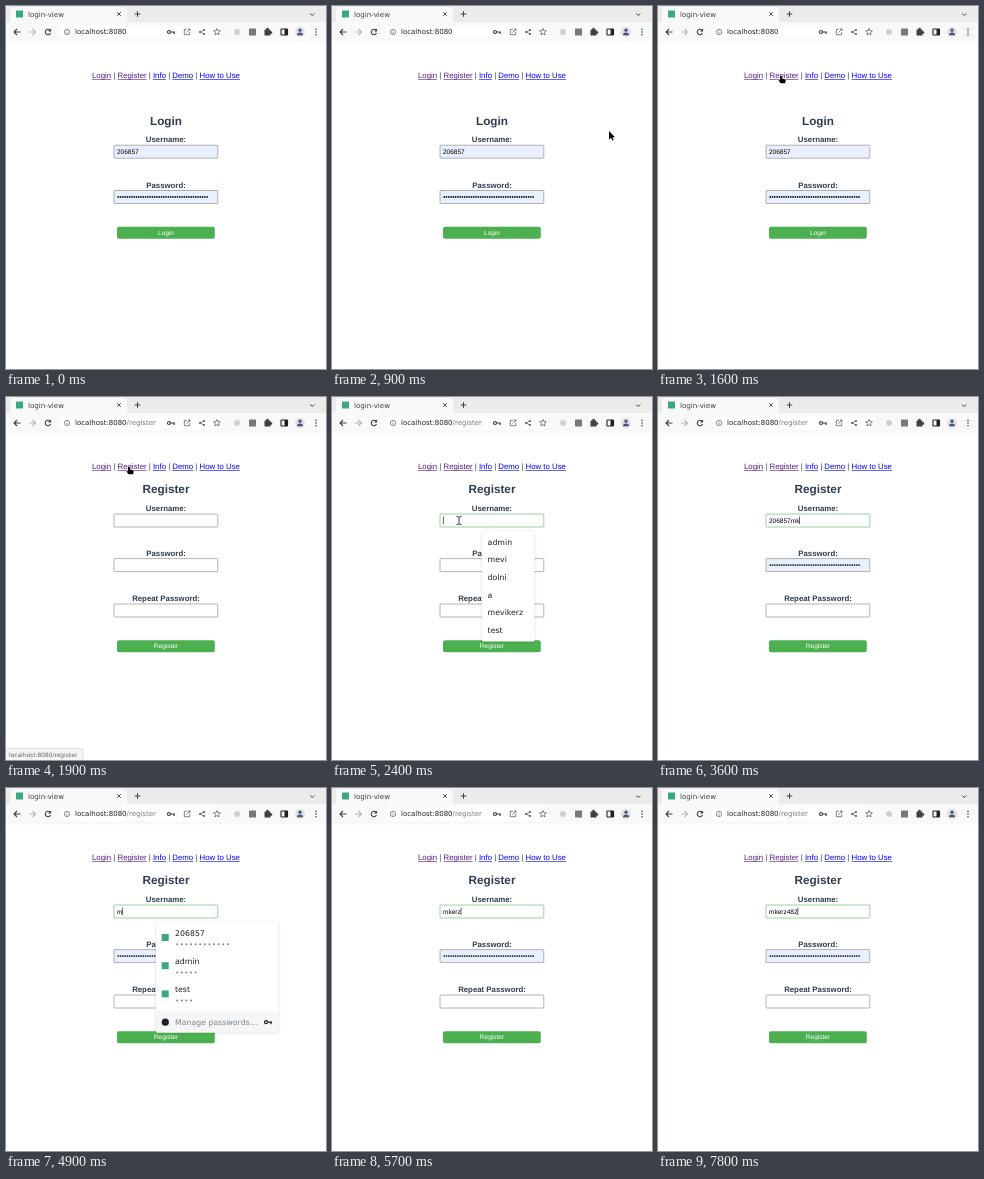
Recreate the animation shown at these times as an HTML page with a canvas. Size 320 px wide and 363 px high, loop 8000 ms.

```html
<!DOCTYPE html>
<html lang="en">
<head>
<meta charset="utf-8">
<title>login-view</title>
<style>
html, body { margin: 0; width: 320px; height: 363px; overflow: hidden; background: #fff; }
canvas { display: block; width: 320px; height: 363px; }
</style>
</head>
<body>
<canvas id="stage"></canvas>
<script>
const W = 320, H = 363, LOOP = 8000;
const ZOOM = 0.4888; // page zoom: 16px text is laid out, then scaled down
const canvas = document.getElementById('stage');
const dpr = window.devicePixelRatio || 1;
canvas.width = W * dpr;
canvas.height = H * dpr;
const c = canvas.getContext('2d');

const UI = '"DejaVu Sans", sans-serif';
const PAGE = '"Liberation Sans", Arial, sans-serif';
const INK = '#2c3e50', DARK = '#202124', GREY = '#5f6368';
const GREEN = '#4caf50', BRAND = '#3aa981', FILLED = '#e8f0fe', EDGE = '#767676';
const USER = '206857';

const typed = [
  [0, ''], [3100, USER], [3200, USER + 'm'], [3600, USER + 'mk'],
  [4200, USER.slice(0, 4)], [4300, ''], [4800, 'm'],
  [5500, 'mk'], [5600, 'mker'], [5700, 'mkerz'],
  [6900, 'mkerz4'], [7000, 'mkerz48'], [7800, 'mkerz482']
];

const path = [
  [100, 164, 145], [300, 164, 145], [600, 185, 174], [900, 277, 125],
  [1200, 170, 46], [1500, 123, 70], [2000, 123, 70], [2300, 127, 123.5],
  [2500, 127, 123.5], [2800, 124, 125], [3100, 124, 125]
];

const within = (t, a, b) => t >= a && t < b;

function text(s, x, y, size, color, family = UI, align = 'left', weight = '') {
  c.save();
  c.translate(x, y);
  c.scale(ZOOM, ZOOM);
  c.font = `${weight} ${size / ZOOM}px ${family}`;
  c.textRendering = 'geometricPrecision';
  c.fillStyle = color;
  c.textAlign = align;
  c.fillText(s, 0, 0);
  const w = c.measureText(s).width * ZOOM;
  c.restore();
  return w;
}

function box(x, y, w, h, color) {
  c.fillStyle = color;
  c.fillRect(x, y, w, h);
}

function rect(x, y, w, h, r, fill, stroke, line = 0.7) {
  c.beginPath();
  c.roundRect(x, y, w, h, r);
  if (fill) { c.fillStyle = fill; c.fill(); }
  if (stroke) { c.strokeStyle = stroke; c.lineWidth = line; c.stroke(); }
}

function disc(x, y, r, color) {
  c.beginPath();
  c.arc(x, y, r, 0, 7);
  c.fillStyle = color;
  c.fill();
}

function ring(x, y, r, color, line = 1, from = 0, to = 7) {
  c.beginPath();
  c.arc(x, y, r, from, to);
  c.strokeStyle = color;
  c.lineWidth = line;
  c.stroke();
}

function stroke(d, x, y, color, line = 1) {
  c.save();
  c.translate(x, y);
  c.strokeStyle = color;
  c.lineWidth = line;
  c.stroke(new Path2D(d));
  c.restore();
}

function shape(d, x, y, fill, edge) {
  c.save();
  c.translate(x, y);
  const p = new Path2D(d);
  if (edge) {
    c.strokeStyle = edge;
    c.lineWidth = 0.8;
    c.lineJoin = 'round';
    c.stroke(p);
  }
  c.fillStyle = fill;
  c.fill(p);
  c.restore();
}

function key(x, y, color) {
  ring(x - 2, y, 1.5, color, 1.2);
  stroke('M-.4 0H4M3 0V2', x, y, color, 1.2);
}

function star(x, y) {
  c.beginPath();
  for (let i = 0; i < 10; i++) {
    const r = i % 2 ? 1.6 : 3.6, a = i * Math.PI / 5;
    c.lineTo(x + r * Math.sin(a), y - r * Math.cos(a));
  }
  c.closePath();
  c.strokeStyle = GREY;
  c.lineWidth = 0.8;
  c.stroke();
}

function browser(registered) {
  box(0, 0, W, 17, '#edebe9');
  rect(4, 1, 117, 20, 4, '#faf9f9');
  box(0, 16, W, 20.5, '#faf9f9');
  rect(10, 4.5, 7, 7, 0, BRAND);
  text('login-view', 22, 10.8, 7.1, '#3c4043');
  stroke('M-1.8 -1.8L1.8 1.8M1.8 -1.8L-1.8 1.8', 113, 8, '#3c4043', 0.9);
  stroke('M-2.8 0H2.8M0 -2.8V2.8', 131.5, 8, '#3c4043');
  stroke('M-2 -1L0 1L2 -1', 306.3, 8.5, '#3c4043');

  stroke('M3.5 0H-3M0 -3L-3 0L0 3', 11, 26, '#3c4043', 1.1);
  stroke('M-3.5 0H3M0 -3L3 0L0 3', 26.5, 26, '#b5b8bc', 1.1);
  ring(42, 26, 2.7, '#3c4043', 1.1, 0.4, 5.5);
  shape('M0 0V-3.2L-3.2 0Z', 45.1, 25.6, '#3c4043');

  rect(53, 19, 164, 14, 7, '#fff');
  ring(61, 26, 2.7, GREY, 0.7);
  stroke('M0 -.3V1.7M0 -1.7V-.9', 61, 26, GREY, 0.7);
  const w = text('localhost:8080', 69, 28.4, 7, DARK);
  if (registered) text('/register', 69 + w, 28.4, 7, '#777a7e');
  key(165, 26, '#3c4043');
  stroke('M0 -2.7H-2.7V2.7H2.7V0M1 -3H3V-1M3 -3L-.5 .5', 181, 26, GREY, 0.8);
  stroke('M2 -2L-2 0L2 2', 196, 26, GREY, 0.8);
  for (const [x, y] of [[2, -2], [-2, 0], [2, 2]]) disc(196 + x, 26 + y, 1.1, GREY);
  star(211, 26);

  disc(231, 26, 3, '#cfd0d2');
  rect(243, 22.5, 7, 7, 0.5, '#77797c');
  rect(258.5, 23.5, 6, 6, 0.5, '#3c4043');
  disc(261.5, 23, 1.3, '#3c4043');
  disc(265, 26.5, 1.3, '#3c4043');
  rect(275, 23, 6.5, 6, 0.5, null, DARK, 1.1);
  box(278.5, 23, 3, 6, DARK);
  disc(294, 26, 5, '#dbe0ea');
  disc(294, 24.2, 1.6, '#46536b');
  shape('M-3 1.2Q-3 -1.6 0 -1.6Q3 -1.6 3 1.2Z', 294, 28, '#46536b');
  for (const dy of [-2.7, 0, 2.7]) disc(310, 26 + dy, 0.8, '#3c4043');
}

function nav() {
  let x = 86;
  const links = ['Login', 'Register', 'Info', 'Demo', 'How to Use'];
  links.forEach((name, i) => {
    const color = i < 2 ? '#551a8b' : '#0000ee';
    const w = text(name, x, 72, 7.82, color, PAGE);
    box(x, 73, w, 0.6, color);
    x += w;
    if (i < links.length - 1) x += text(' | ', x, 72, 7.82, INK, PAGE);
  });
}

function field(label, y, value, fill = '#fff', border = EDGE) {
  text(label, 160, y - 2.6, 7.82, INK, PAGE, 'center', 'bold');
  rect(108, y + 0.2, 103.8, 13, 0.8, fill, border, 0.55);
  return text(value, 111, y + 8.9, 6.52, '#000', PAGE);
}

function secret(y) {
  for (let i = 0; i < 40; i++) disc(112.2 + i * 2.28, y + 6.6, 0.85, '#000');
}

function button(label, y) {
  rect(111, y, 97.8, 12, 2, GREEN);
  text(label, 160, y + 8.2, 6.52, '#fff', PAGE, 'center');
}

function heading(s, y) {
  text(s, 160, y, 11.73, INK, PAGE, 'center', 'bold');
}

function loginPage() {
  heading('Login', 119);
  field('Username:', 139, USER, FILLED);
  field('Password:', 184.3, '', FILLED);
  secret(184.3);
  button('Login', 220.7);
}

function registerPage(t) {
  const focus = t >= 2300, filled = t >= 3100;
  let value = '';
  for (const [at, s] of typed) if (t >= at) value = s;
  heading('Register', 96.3);
  const w = field('Username:', 116.8, value, '#fff', focus ? GREEN : EDGE);
  const blinkOff = within(t, 6300, 6700) || within(t, 7600, 7800);
  if (focus && !blinkOff) box(111 + w, 119.5, 0.6, 7.5, '#000');
  field('Password:', 161.4, '', filled ? FILLED : '#fff');
  if (filled) secret(161.4);
  field('Repeat Password:', 206.8, '');
  button('Register', 243.2);
  if (within(t, 2400, 3100)) historyList();
  if (within(t, 3100, 3200) || within(t, 4400, 5000)) passwordList();
}

function popup(w) {
  c.save();
  c.shadowColor = 'rgba(0,0,0,.16)';
  c.shadowBlur = 3 * dpr;
  c.shadowOffsetY = 0.5 * dpr;
  rect(150, 134.5, w, 110, 1.5, '#fff');
  c.restore();
  shape('M-4.5 0L0 -4L4.5 0Z', 159.5, 135, '#fff');
  stroke('M-4.5 0L0 -4L4.5 0', 159.5, 134.5, '#e6e7e9', 0.5);
}

function historyList() {
  popup(52.5);
  ['admin', 'mevi', 'dolni', 'a', 'mevikerz', 'test'].forEach((s, i) =>
    text(s, 155.6, 147.8 + i * 17.6, 7.82, DARK));
}

function passwordList() {
  popup(122.5);
  [[USER, 12], ['admin', 5], ['test', 4]].forEach(([name, count], i) => {
    const y = i * 28.2;
    rect(155.7, 146 + y, 7, 7, 0, BRAND);
    text(name, 169, 147.6 + y, 7.82, DARK);
    for (let k = 0; k < count; k++) disc(171.2 + k * 4.6, 156.2 + y, 1, '#80868b');
  });
  rect(150, 223, 122.5, 21.5, [0, 0, 1.5, 1.5], '#f5f6f7');
  disc(159.3, 234.2, 3.6, DARK);
  text('Manage passwords…', 169, 237, 7.82, '#80868b');
  key(262, 234.2, DARK);
}

function statusBubble() {
  rect(-2, 351.5, 79, 13, 2, '#f6f5f4', '#d0cecc', 0.6);
  text('localhost:8080/register', 3, 359.6, 5.9, GREY);
}

function pointer(t) {
  if (!within(t, 100, 3100)) return;
  let i = 0;
  while (i < path.length - 2 && t >= path[i + 1][0]) i++;
  const [t0, x0, y0] = path[i], [t1, x1, y1] = path[i + 1];
  const k = (t - t0) / (t1 - t0);
  const x = x0 + (x1 - x0) * k, y = y0 + (y1 - y0) * k;
  const inField = top => x > 108 && x < 212 && y > top && y < top + 13.5;
  const tops = t < 1900 ? [139, 184.3] : [116.8, 161.4, 206.8];
  if (tops.some(inField)) {
    stroke('M-2.5 -4Q0 -4 0 -3Q0 -4 2.5 -4M0 -3V3M-2.5 4Q0 4 0 3Q0 4 2.5 4',
      x, y, '#000', 0.8);
  } else if (x > 111 && x < 141 && y > 65 && y < 76) {
    shape('M-.9 0Q0 -1 .9 0V2.6L4.2 3.4Q5 3.8 4.7 5L4 7.3H-.3L-2.6 4.6Q-2.2 3.6 -.9 4.6Z',
      x, y, '#000', '#fff');
  } else {
    shape('M0 0V8.5L2 6.7L3.4 9.6L4.7 9L3.4 6.2H6Z', x, y, '#000', '#fff');
  }
}

function draw(now) {
  const t = Math.floor(now % LOOP / 100) * 100;
  const registered = t >= 1900;
  c.setTransform(dpr, 0, 0, dpr, 0, 0);
  box(0, 0, W, H, '#fff');
  browser(registered);
  nav();
  if (registered) registerPage(t);
  else loginPage();
  if (within(t, 1700, 2300)) statusBubble();
  pointer(t);
}

const start = performance.now();
function tick() {
  draw(performance.now() - start);
  requestAnimationFrame(tick);
}
tick();
</script>
</body>
</html>
```
